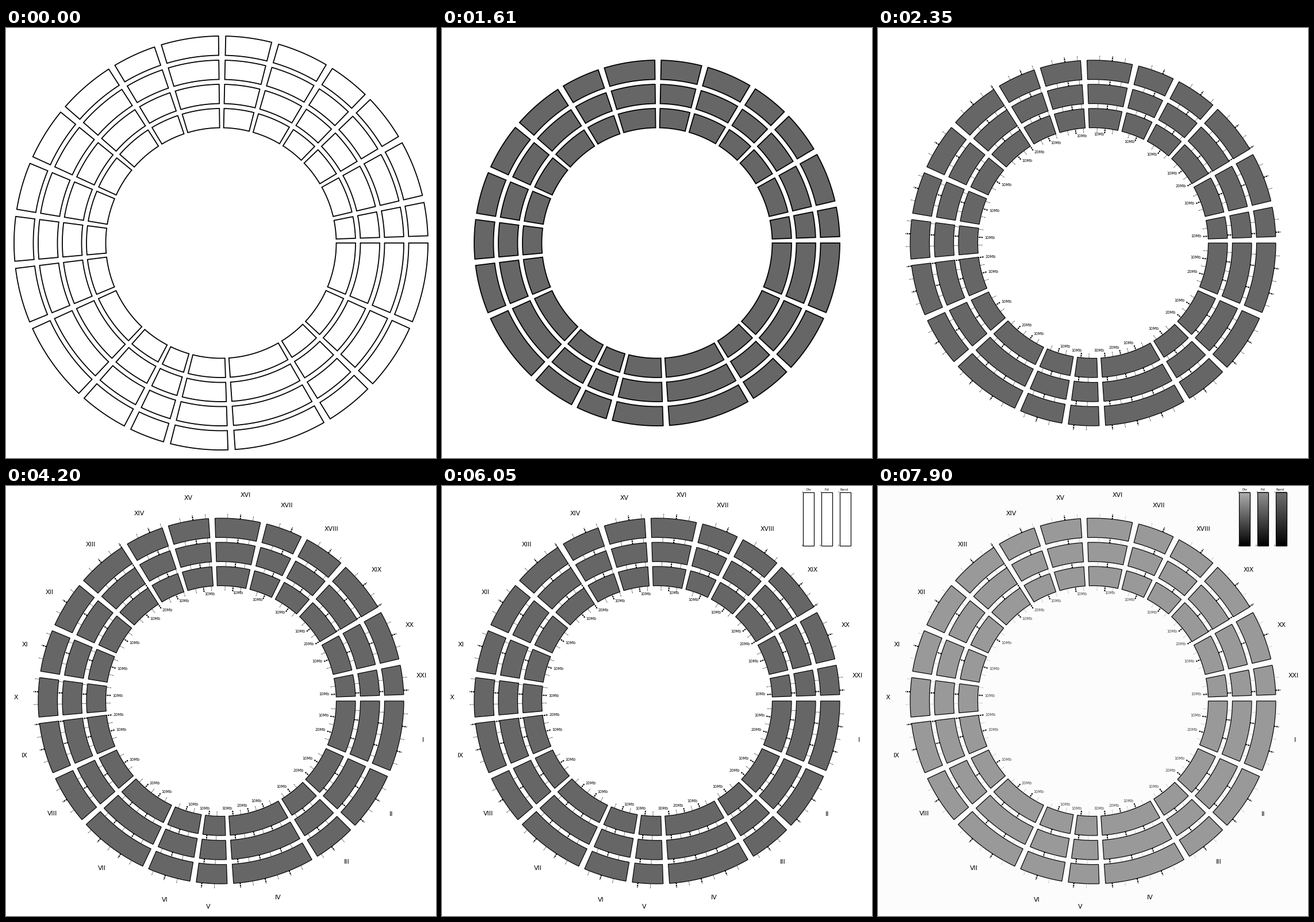
These frames come from a looping animation (748x748 px, 8 s). A matplotlib script:

```python
import numpy as np
import matplotlib.pyplot as plt
from matplotlib.animation import FuncAnimation
from matplotlib.collections import LineCollection, PolyCollection
from matplotlib.patches import Rectangle

SIZE, DPI, STEP = 748, 100, 50
PT = 72 / DPI                      # points per pixel
CENTER = 374
GAP = 2                            # degrees between chromosomes
RING_INNER, RING_STEP, RING_WIDTH = 200.5, 42, 33.5
TICK_LENGTH = 8.5
SCENE_STARTS = [0, 500, 2350, 4200, 6050, 7900]
LOOP = 8000

# Chromosome lengths in megabases, in numeric order
LENGTHS = dict(zip(
    "I II III IV V VI VII VIII IX X XI XII XIII XIV XV XVI XVII XVIII XIX XX XXI".split(),
    [28.186, 23.296, 16.799, 32.633, 12.251, 17.084, 27.937, 19.369, 20.249,
     15.657, 16.706, 18.401, 20.083, 15.246, 16.199, 18.116, 14.603, 16.283,
     20.241, 19.732, 11.717]))
SCALE = (360 - GAP * len(LENGTHS)) / sum(LENGTHS.values())

plt.rcParams["font.family"] = "DejaVu Sans"
fig = plt.figure(figsize=(SIZE / DPI, SIZE / DPI), dpi=DPI, facecolor="white")
ax = fig.add_axes([0, 0, 1, 1])
ax.axis("off")


def polar(radius, degrees):
    angle = np.radians(degrees)
    return np.column_stack([CENTER + radius * np.cos(angle),
                            CENTER + radius * np.sin(angle)])


def layout(names):
    """Start angle of each chromosome, clockwise from the right."""
    starts, angle = {}, 0
    for name in names:
        starts[name] = angle
        angle += LENGTHS[name] * SCALE + GAP
    return starts


def add_rings(starts, count, fill, width):
    sectors = []
    for ring in range(count):
        inner = RING_INNER + ring * RING_STEP
        for name, start in starts.items():
            arc = np.linspace(start, start + LENGTHS[name] * SCALE, 40)
            sectors.append(np.vstack([polar(inner, arc),
                                      polar(inner + RING_WIDTH, arc[::-1])]))
    return ax.add_collection(PolyCollection(
        sectors, facecolors=fill, edgecolors="black", linewidths=width * PT,
        joinstyle="miter"))


def add_ticks(angles, color, width, dashes):
    radii = [RING_INNER - TICK_LENGTH] + [
        RING_INNER + RING_WIDTH + ring * RING_STEP for ring in range(3)]
    lines = [np.vstack([polar(r, a), polar(r + TICK_LENGTH, a)])
             for r in radii for a in angles]
    return ax.add_collection(LineCollection(
        lines, colors=color, linewidths=width * PT, linestyles=[(0, dashes)],
        capstyle="butt"))


def add_text(x, y, text, size, ha="center"):
    return ax.text(x, y, text, fontsize=size * PT, ha=ha, va="baseline")


def add_label(angle, radius, text, size, flip_end=283):
    """Horizontal label, anchored left on the left side of the circle."""
    x, y = polar(radius, angle)[0]
    left = 100 < angle < flip_end
    return add_text(x, y + size * (0.36 if left else 0.09), text, size,
                    "left" if left else "right")


def add_scale_bar(x, title, title_x):
    box = ax.add_patch(Rectangle((x, 10.5), 18.5, 93.5, facecolor="none",
                                 edgecolor="black", linewidth=1.2 * PT, zorder=4))
    return [box, add_text(title_x, 8.3, title, 5.5),
            add_text(x - 2, 11.8, "1", 3.5), add_text(x - 2, 105, "0", 3.5)]


def add_gradient(x, top):
    shades = np.linspace(top, 0, 94)[:, None] / 255
    return ax.imshow(shades, cmap="gray", vmin=0, vmax=1, aspect="auto",
                     extent=(x, x + 18.5, 104, 10.5), zorder=3)


by_name = layout(sorted(LENGTHS))
by_number = layout(LENGTHS)
marks = [(start + mb * SCALE, mb) for name, start in by_number.items()
         for mb in range(5, int(LENGTHS[name]) + 1, 5)]
major = [(angle, mb) for angle, mb in marks if mb % 10 == 0]
minor = [angle for angle, mb in marks if mb % 10]

outline = add_rings(by_name, 4, "white", 1.8)
solid = add_rings(by_name, 3, "#666666", 1.8)
ordered = add_rings(by_number, 3, "#666666", 1.2)
minor_ticks = add_ticks(minor, "#555555", 0.9, (4, 1))
major_ticks = add_ticks([angle for angle, _ in major], "black", 2, (1.3, 0.6))

distances, early, late = [], [], []
for angle, mb in major:
    text = f"{mb}Mb"
    if 270 < angle < 283:
        early.append(add_label(angle, 189, text, 6.6, flip_end=270))
        late.append(add_label(angle, 189, text, 6.6))
    else:
        distances.append(add_label(angle, 189, text, 6.6))

numerals = [add_label(start + LENGTHS[name] * SCALE / 2, 360, name, 11)
            for name, start in by_number.items()]

bars, gradients = [], []
for x, title, title_x, top in [(628.5, "Div", 638, 176), (660.3, "Fst", 670, 146),
                               (692.2, "Rand", 699.3, 112)]:
    bars += add_scale_bar(x, title, title_x)
    gradients.append(add_gradient(x, top))

ax.set_xlim(0, SIZE)
ax.set_ylim(SIZE, 0)

# Artists with the first and last scene in which they show
SHOWN = [([outline], 0, 0), ([solid], 1, 1),
         ([ordered, minor_ticks, major_ticks] + distances, 2, 5),
         (early, 2, 2), (late, 3, 5), (numerals, 3, 5),
         (bars, 4, 5), (gradients, 5, 5)]


def update(frame):
    scene = sum(frame * STEP >= start for start in SCENE_STARTS) - 1
    for artists, first, last in SHOWN:
        for artist in artists:
            artist.set_visible(first <= scene <= last)
    shaded = scene == 5
    fig.set_facecolor("#fcfcfc" if shaded else "white")
    ordered.set_facecolor("#999999" if shaded else "#666666")
    minor_ticks.set_color("#bbbbbb" if shaded else "#555555")
    for label in distances + late:
        label.set_color("#444444" if shaded else "black")
    return []


animation = FuncAnimation(fig, update, frames=LOOP // STEP, interval=STEP,
                          init_func=lambda: update(0), repeat=True,
                          repeat_delay=0, blit=False)
plt.show()
```
